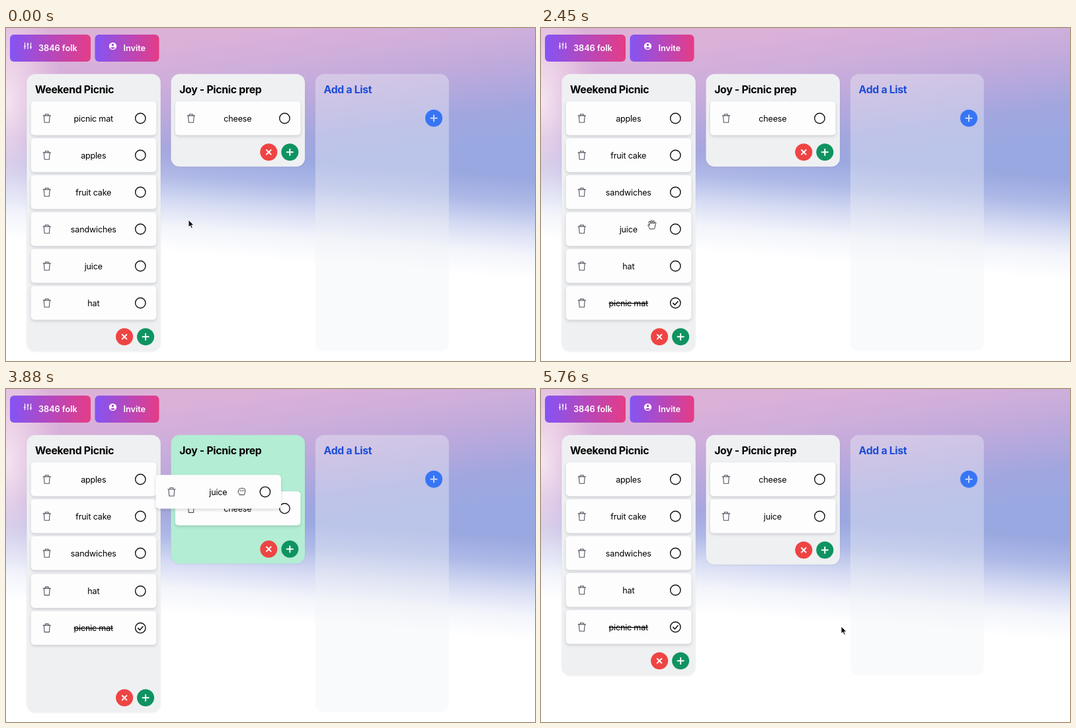
An HTML page for the animation above (5790 ms loop, 800 by 505 pixels).

```html
<!DOCTYPE html>
<html lang="en">
<head>
<meta charset="utf-8">
<title>Picnic lists</title>
<style>
  html, body { margin: 0; width: 100%; height: 100%; overflow: hidden; background: #fff; }
  svg { display: block; width: 100vw; height: 100vh; }
  text { font-family: Inter, "Open Sans", sans-serif; }
  .title { font-size: 15.8px; font-weight: 700; letter-spacing: -.3px; }
  .item { font-size: 12.6px; letter-spacing: -.2px; text-anchor: middle; }
  .done { text-decoration: line-through; }
  .button { font-size: 12.8px; font-weight: 600; letter-spacing: -.08px; fill: #fff; }
  .card { fill: #fdfdfe; filter: drop-shadow(0 2px 2px rgba(20, 25, 40, .16)); }
  .panel { filter: drop-shadow(0 1px 1px rgba(20, 25, 40, .06)); }
  .line { fill: none; stroke-linecap: round; stroke-linejoin: round; }
</style>
</head>
<body>
<svg viewBox="0 0 800 505" preserveAspectRatio="none">
  <defs>
    <linearGradient id="sky" gradientUnits="userSpaceOnUse" x1="380" y1="0" x2="410" y2="215">
      <stop offset="0" stop-color="#dcb1d8"/>
      <stop offset=".28" stop-color="#ceaedb"/>
      <stop offset=".52" stop-color="#bca9dc"/>
      <stop offset=".8" stop-color="#a2a6df"/>
      <stop offset="1" stop-color="#9aa8e1"/>
    </linearGradient>
    <linearGradient id="fade" gradientUnits="userSpaceOnUse" x1="400" y1="197" x2="388" y2="350">
      <stop offset="0" stop-color="#fff" stop-opacity="0"/>
      <stop offset=".25" stop-color="#fff" stop-opacity=".2"/>
      <stop offset=".5" stop-color="#fff" stop-opacity=".58"/>
      <stop offset=".75" stop-color="#fff" stop-opacity=".88"/>
      <stop offset="1" stop-color="#fff"/>
    </linearGradient>
    <radialGradient id="glow">
      <stop offset="0" stop-color="#f8e8f2" stop-opacity=".95"/>
      <stop offset=".4" stop-color="#f2dcec" stop-opacity=".65"/>
      <stop offset="1" stop-color="#ecd2e8" stop-opacity="0"/>
    </radialGradient>
    <linearGradient id="candy">
      <stop offset="0" stop-color="#8454f4"/>
      <stop offset="1" stop-color="#e53c86"/>
    </linearGradient>
  </defs>

  <rect width="800" height="505" fill="url(#sky)"/>
  <ellipse cx="0" cy="110" rx="85" ry="185" fill="url(#glow)"/>
  <rect width="800" height="505" fill="url(#fade)"/>

  <g fill="url(#candy)">
    <rect x="6" y="10" width="122" height="41" rx="6"/>
    <rect x="134.5" y="10" width="97" height="41" rx="6"/>
  </g>
  <path class="line" stroke="#fff" stroke-width="1.2"
    d="M28.5 22.5v9M33 22.5v9M37.5 22.5v9M27.2 28h2.6M31.7 25h2.6M36.2 29h2.6"/>
  <text class="button" x="49" y="35.2">3846 folk</text>
  <circle cx="161.5" cy="27.5" r="5.6" fill="#fff"/>
  <circle cx="161.5" cy="25.6" r="1.8" fill="#a74bcc"/>
  <path d="M158 30.3q3.5-2.8 7 0q-3.5 3-7 0" fill="#a74bcc"/>
  <text class="button" x="177.5" y="35.2">Invite</text>

  <g id="scene"></g>
</svg>
<script>
const LOOP = 5790, ROW = 56, TOP = 111.2;
const CHECK = 1730, LIFT = 3580, FOLLOW = 3690, ENTER = 3740, DROP = 4450, SETTLE = 4820, SHRINK = 5080;
const scene = document.getElementById('scene');

// pointer stops: time, x, y
const stops = [
  [0, 276, 291], [400, 276, 291], [1300, 205, 142], [1820, 205, 142],
  [2350, 168, 298], [3300, 168, 298], [3640, 331, 179], [3690, 331, 179],
  [3950, 362, 150], [4200, 372, 184], [4900, 372, 184], [5030, 373, 183],
  [5120, 373, 183], [5650, 454, 360], [LOOP, 454, 360]
];

const shapes = {
  arrow: 'M0 0V11L2.6 8.7L4.4 12.8L6.3 12L4.6 8H8Z',
  pointer: 'M-1.3 .8Q0-.8 1.3 .8V5q1.2-.7 2 .3q1.2-.5 1.9 .5q1.5-.3 1.7 1.2V9.5Q6.5 11.5 5.5 13.5H-1Q-2 11-4 8.5q-.5-1.6 1-1.3L-1.3 8.5Z',
  open: 'M-3.5 6.8Q-4 4.5-6 1.8q-.6-1.6 1-1.5L-3.6 1.5L-4.9-3.6q.2-1.8 1.8-.9L-1.8-1.2L-2.2-5.6q.8-1.7 2 0L.3-1.5L1.1-5.4q1.3-1.4 2 .3L2.4-.9L4.2-3.2q1.6-.7 1.6 .9L4.6 2Q4.6 4.5 3.2 6.8Z',
  fist: 'M-3.5 5.5Q-3.5 3.8-5.5 1.5q-.6-2 1-2V-2.5q.5-1.8 2.3-1.4q1.2-1.5 2.6-.4q1.5-.8 2.4 .4q2-.4 2.2 1.4V1.5Q4.8 3.5 3.6 5.5ZM-1.8-1.8v2M.5-2v2.2M2.7-1.8v2'
};

const clamp = v => Math.min(1, Math.max(0, v));
const mix = (a, b, k) => a + (b - a) * k;
const ease = (t, start, length) => 1 - (1 - clamp((t - start) / length)) ** 3;
const rowY = i => TOP + ROW * i;

function pointerAt(t) {
  const i = stops.findIndex(s => s[0] > t);
  const [t0, x0, y0] = stops[i - 1], [t1, x1, y1] = stops[i];
  const p = (t - t0) / (t1 - t0), k = p * p * (3 - 2 * p);
  return [mix(x0, x1, k), mix(y0, y1, k)];
}

function pointerKind(t, x) {
  if (t < 1820) return x > 230 ? 'arrow' : x > 212 ? 'open' : 'pointer';
  if (t < 1920) return 'pointer';
  if (t < 3280) return 'open';
  if (t < DROP) return 'fist';
  return t < SETTLE ? 'open' : 'arrow';
}

const cursor = (kind, x, y) => `<path transform="translate(${x} ${y})" d="${shapes[kind]}"
  stroke-linejoin="round" stroke-width=".9" ${kind === 'arrow'
    ? 'fill="#111" stroke="#fff"' : 'fill="#fff" stroke="#222"'}/>`;

const disc = (x, y, color, mark, ink = '#fff') => `<g transform="translate(${x} ${y})">
  <circle r="13" fill="${color}"/>
  <path class="line" stroke="${ink}" stroke-width="2" d="${mark}"/></g>`;
const PLUS = 'M-4.6 0H4.6M0-4.6V4.6', CROSS = 'M-3.3-3.3L3.3 3.3M-3.3 3.3L3.3-3.3';

const panel = (x, height, fill, title) => `
  <rect class="panel" x="${x}" y="69.8" width="202.5" height="${height}" rx="13" fill="${fill}"/>
  <text class="title" x="${x + 12.7}" y="99.2">${title}</text>
  ${disc(x + 147.8, 47.8 + height, '#ef4444', CROSS)}
  ${disc(x + 179.8, 47.8 + height, '#0f9361', PLUS)}`;

const card = (label, x, y, done) => `<g transform="translate(${x} ${y})">
  <rect class="card" width="189.5" height="51.3" rx="5"/>
  <path class="line" stroke="#50545f" stroke-width="1.1"
    d="M18.4 21.7H29.6M21.6 21.5V19.5H26.4V21.5M19.6 22L20.4 32H27.6L28.4 22"/>
  <text class="item ${done ? 'done' : ''}" x="94.5" y="30.4">${label}</text>
  <circle cx="165.5" cy="25.8" r="7.7" fill="none" stroke="#111" stroke-width="1.4"/>
  ${done ? '<path class="line" stroke="#111" stroke-width="1.6" d="M162 26.2L164.6 28.8L169.2 23.6"/>' : ''}</g>`;

function draw(t) {
  const [px, py] = pointerAt(t);
  const checked = t >= CHECK;
  const names = ['apples', 'fruit cake', 'sandwiches', 'juice', 'hat'];
  checked ? names.push('picnic mat') : names.unshift('picnic mat');

  const left = ease(t, ENTER, 200);
  const tall = 420.5 - ROW * ease(t, SHRINK, 200);
  const second = 140.5 + ROW * left;
  const tint = on => on ? '#b3edd3' : '#eff0f2';
  const nudge = ROW * (ease(t, ENTER + 40, 250) - ease(t, 4105, 250));

  // the dragged card lags, catches up with the pointer, then glides into its slot
  let jx = 37.8, jy = rowY(3);
  if (checked && t >= LIFT) {
    const k = ease(t, FOLLOW, 100), d = ease(t, DROP, 330);
    jx = mix(jx + mix(9.5, px - 168, k), 255.9, d);
    jy = mix(jy + mix(-6, py - 304, k), rowY(1), d);
  }

  const cards = names.map((name, i) => {
    if (checked && name === 'juice') return '';
    const y = rowY(i) - (checked && i > 3 ? ROW * left : 0);
    return card(name, 37.8, y, checked && name === 'picnic mat');
  }).join('');

  scene.innerHTML =
    `<rect x="467.8" y="69.8" width="202" height="${tall}" rx="13" fill="#eef1f4" opacity=".38"/>
    <text class="title" x="480.5" y="99.2" fill="#1c4dd7">Add a List</text>` +
    disc(647, 136.8, '#3775f5', PLUS, '#c9d9fd') +
    panel(31.3, tall, tint(t >= LIFT && t < ENTER), 'Weekend Picnic') +
    panel(249.5, second, tint(t >= ENTER && t < SETTLE), 'Joy - Picnic prep') +
    cards + card('cheese', 255.9, TOP + nudge) +
    (checked ? card('juice', jx, jy) : '') +
    cursor(pointerKind(t, px), px, py);
}

function tick() {
  draw(performance.now() % LOOP);
  requestAnimationFrame(tick);
}
tick();
</script>
</body>
</html>
```
